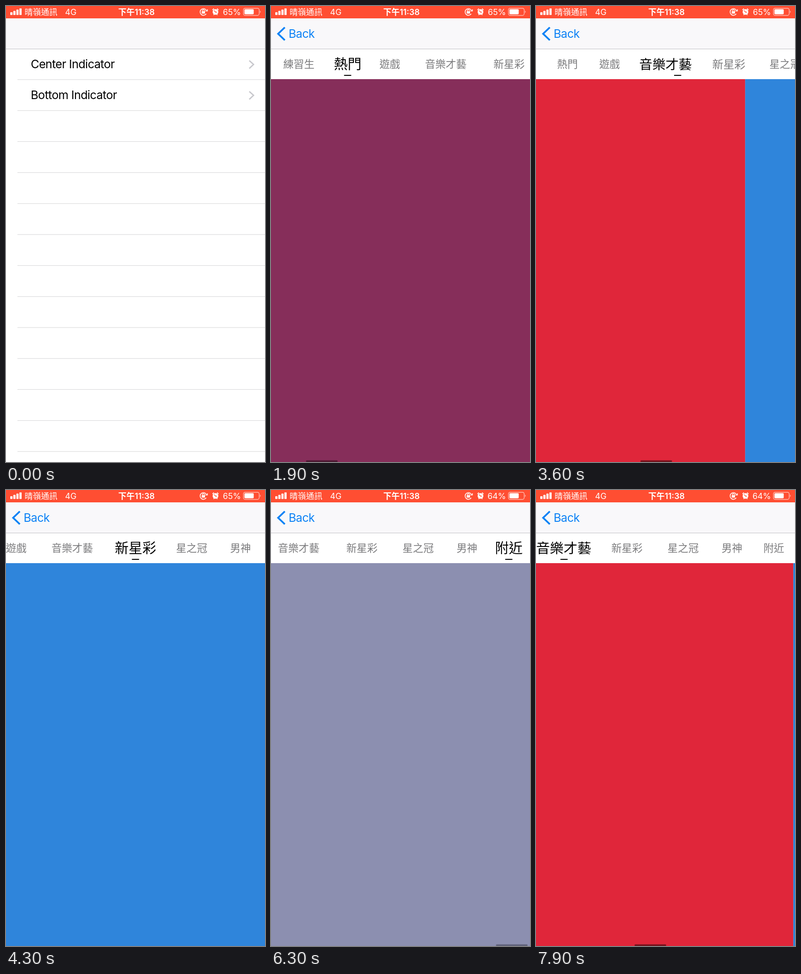
An HTML page that plays this animation: 544x960 px, repeating every 8000 ms.

```html
<!DOCTYPE html>
<html lang="zh-Hant">
<head>
<meta charset="utf-8">
<title>Tab pager</title>
<style>
  html, body { margin: 0; width: 100%; height: 100%; overflow: hidden; background: #fff; }
  svg { display: block; width: 544px; height: 960px; }
  text { font-family: Inter, 'Noto Sans CJK TC', 'Noto Sans CJK JP', 'Noto Sans CJK', sans-serif; }
  .body { font-size: 24.4px; letter-spacing: -.6px; }
  .status text { font-size: 17.3px; fill: #fff; }
  .tab { font-size: 21.8px; text-anchor: middle; font-family: 'Noto Sans CJK TC', 'Noto Sans CJK JP', 'Noto Sans CJK', sans-serif; }
</style>
</head>
<body>
<svg viewBox="0 0 544 960">
  <rect width="544" height="960" fill="#fff"/>
  <g id="list">
    <rect y="91" width="544" height="869" fill="#fff"/>
    <rect id="press" y="91" width="544" height="63" fill="#d9d9d9"/>
    <g id="lines" fill="#dcdcdd"></g>
    <text class="body" x="52" y="131">Center Indicator</text>
    <text class="body" x="52" y="196">Bottom Indicator</text>
    <path d="M511 115l9 8l-9 8.500M511 180l9 8l-9 8.500" fill="none" stroke="#c7c7cc" stroke-width="2.600"/>
  </g>
  <rect id="dim" y="91" width="544" height="869" fill="#000"/>
  <g id="page">
    <rect y="91" width="544" height="869" fill="#fff"/>
    <g id="panes"></g>
    <g id="tabs"></g>
    <rect id="mark" y="145" width="15" height="2" fill="#000"/>
    <rect id="thumb" y="956.500" width="66.500" height="3.500" rx="1.750" fill="#000"/>
  </g>
  <rect y="26" width="544" height="65" fill="#f9f8fa"/>
  <rect y="90" width="544" height="1" fill="#c2c1c4"/>
  <g id="back" fill="#0c82f5">
    <path d="M29 45L15 58.500L29 72" fill="none" stroke="#0c82f5" stroke-width="3.800"/>
    <text class="body" x="37" y="67">Back</text>
  </g>
  <g class="status">
    <rect width="544" height="26" fill="#ff4e32"/>
    <g id="bars" fill="#fff"></g>
    <text x="39" y="19">晴嶺通訊</text>
    <text x="124" y="18.500">4G</text>
    <text x="274" y="18.500" text-anchor="middle" font-weight="600">下午11:38</text>
    <g fill="none" stroke="#fff" stroke-width="1.600">
      <path d="M421 9.500A7 7 0 1 0 420.500 16.500M418.500 10.500h4.500v-3.500"/>
      <path d="M412.500 11.500v-2a2 2 0 0 1 4 0v2" stroke-width="1.300"/>
      <path d="M433.800 8.500a9 9 0 0 1 3-3M446.200 8.500a9 9 0 0 0 -3 -3M436 19l1.500-2M444 19l-1.500-2"/>
    </g>
    <rect x="411" y="11" width="7" height="5" rx=".8" fill="#fff"/>
    <circle cx="440" cy="12.500" r="6" fill="#fff"/>
    <path d="M437.500 9.500l2.500 3.500h3" fill="none" stroke="#ff4e32" stroke-width="1.300"/>
    <text id="charge" x="493.500" y="18.500" text-anchor="end"></text>
    <rect x="498.700" y="4.700" width="33" height="15" rx="3.500" fill="none" stroke="#fff" stroke-opacity=".6" stroke-width="1.400"/>
    <rect x="500.800" y="6.800" width="19.500" height="10.800" rx="1.800" fill="#fff"/>
    <path d="M533.500 9.500q3 2.700 0 5.400z" fill="#fff" fill-opacity=".6"/>
  </g>
</svg>
<script>
const LOOP = 8000, W = 544;
const NS = 'http://www.w3.org/2000/svg';
const $ = id => document.getElementById(id);
const clamp = (v, lo = 0, hi = 1) => Math.min(hi, Math.max(lo, v));

function add(parent, name, attrs, text) {
  const el = document.createElementNS(NS, name);
  for (const k in attrs) el.setAttribute(k, attrs[k]);
  if (text) el.textContent = text;
  return parent.appendChild(el);
}
const set = (id, key, value) => $(id).setAttribute(key, value);

const names = ['練習生', '熱門', '遊戲', '音樂才藝', '新星彩', '星之冠', '男神', '附近'];
const centers = [58.5, 161, 249.5, 367, 500, 618, 720.5, 808.5];
const colors = ['#4b9a8c', '#862e5a', '#d99a4e', '#e0263a', '#2f85db', '#96d7ff', '#ffd8a3', '#8c8fb0'];
const offsetFor = i => clamp(centers[i] - W / 2, 0, 309);

// start, end, from page, to page
const swipes = [
  [1380, 1880, 0, 1], [2090, 2600, 1, 2], [2790, 3250, 2, 3], [3525, 4025, 3, 4],
  [4450, 4930, 4, 5], [5075, 5575, 5, 6], [5720, 6230, 6, 7],
  [6680, 6980, 7, 6], [6980, 7290, 6, 5], [7290, 7600, 5, 4], [7600, 7985, 4, 3]
];
// the tab strip recentres only once a swipe has come to rest
const recentres = [[3250, 2, 3], [4000, 3, 4], [4930, 4, 5]];

const smooth = u => u * u * (3 - 2 * u);
const glide = u => smooth(1 - (1 - u) ** 2);

function pageAt(t) {
  let p = 0;
  for (const [a, b, from, to] of swipes)
    if (t >= a) p = from + (to - from) * glide(clamp((t - a) / (b - a)));
  return p;
}

function offsetAt(t) {
  let x = 0;
  for (const [a, i, j] of recentres)
    if (t >= a) x = offsetFor(i) + (offsetFor(j) - offsetFor(i)) * smooth(clamp((t - a) / 290));
  return x;
}

function thumbAlpha(t) {
  let alpha = 0;
  for (const [a, b] of swipes)
    if (t >= a) alpha = Math.min(clamp((t - a) / 60 + .3), 1 - clamp((t - b) / 200));
  return alpha * .48;
}

for (let i = 0; i < 13; i++)
  add($('lines'), 'rect', { x: 24, y: 154.3 + 65.25 * i, width: 520, height: 1.2 });
for (let i = 0; i < 4; i++)
  add($('bars'), 'rect', { x: 9 + 6.4 * i, y: 13 - 2.7 * i, width: 4.6, height: 6 + 2.7 * i, rx: 1 });
const panes = colors.map(fill => add($('panes'), 'rect', { y: 154, width: W + .3, height: 806, fill }));
const tabs = names.map(name => add($('tabs'), 'text', { class: 'tab', y: 8.3 }, name));

function draw(t) {
  const push = 1 - (1 - clamp((t - 120) / 490)) ** 3;
  set('list', 'transform', `translate(${-163 * push})`);
  set('page', 'transform', `translate(${W * (1 - push)})`);
  set('press', 'opacity', t >= 100 ? 1 : 0);
  set('dim', 'opacity', .1 * push);
  set('back', 'opacity', push);

  const p = pageAt(t), offset = offsetAt(t), active = Math.round(p);
  panes.forEach((pane, i) => {
    pane.setAttribute('x', (i - p) * W);
    pane.setAttribute('visibility', Math.abs(i - p) < 1 ? 'visible' : 'hidden');
  });
  tabs.forEach((tab, i) => {
    const scale = 1 + .33 * clamp(1 - Math.abs(i - p));
    tab.setAttribute('transform', `translate(${centers[i] - offset} 122) scale(${scale})`);
    tab.setAttribute('fill', i === active ? '#000' : '#7b7b7d');
    tab.setAttribute('font-weight', i === active ? 500 : 400);
  });

  const i = Math.min(Math.floor(p), names.length - 2);
  const x = centers[i] + (centers[i + 1] - centers[i]) * (p - i);
  set('mark', 'x', x - offset - 7.5);
  set('thumb', 'x', 7 + 66.5 * p);
  set('thumb', 'opacity', thumbAlpha(t));
  $('charge').textContent = t < 6000 ? '65%' : '64%';
}

const begin = performance.now();
function tick() {
  draw((performance.now() - begin) % LOOP);
  requestAnimationFrame(tick);
}
draw(0);
requestAnimationFrame(tick);
</script>
</body>
</html>
```
